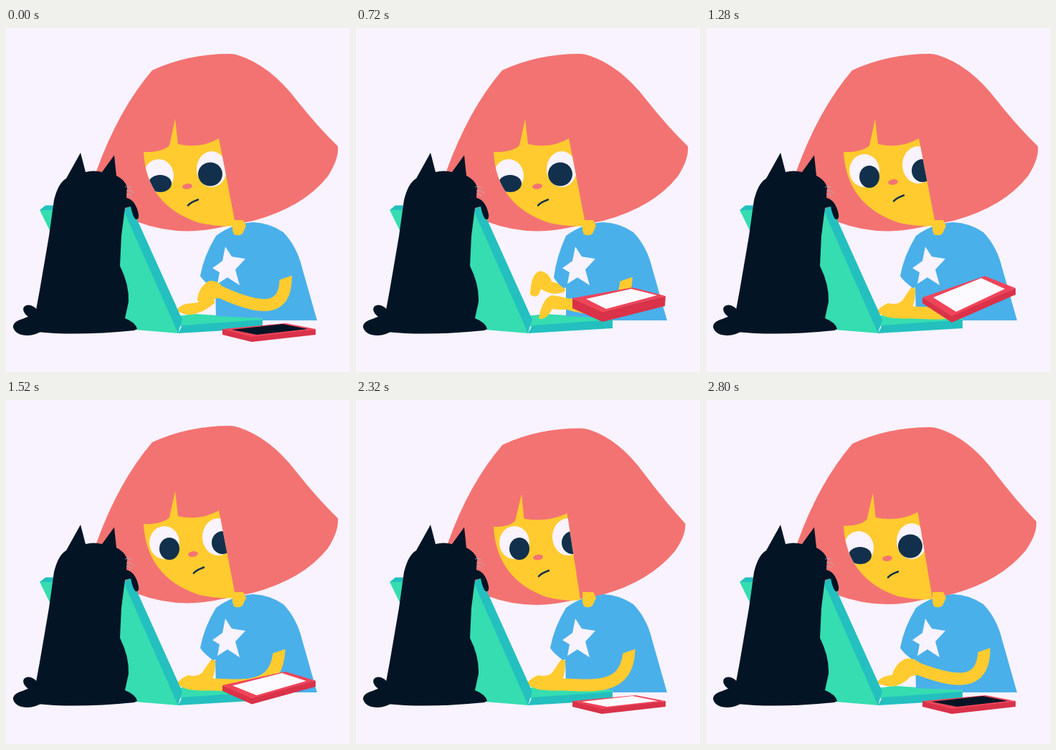
Write an HTML page that moves like this. It is 480 px wide and 480 px high and loops after 2.88 s.

```html
<!DOCTYPE html>
<html lang="en">
<head>
<meta charset="utf-8">
<title>Girl, cat and phone</title>
<style>
html, body { margin: 0; width: 100%; height: 100%; overflow: hidden; background: #f8f3ff; }
svg { display: block; width: 100%; height: 100%; }
.skin { fill: #ffcb2f; }
.limb { fill: none; stroke: #ffcb2f; stroke-width: 17; stroke-linecap: round; }
.shirt { fill: #4ab0ea; }
.hair { fill: #f37372; }
.white { fill: #f8f3ff; }
.pupil { fill: #12304c; }
.line { fill: none; stroke: #12304c; stroke-width: 2.6; stroke-linecap: round; }
.green { fill: #35ddb0; }
.teal { fill: #23c0bf; }
.cat { fill: #031425; }
</style>
</head>
<body>
<svg viewBox="0 0 480 480">
  <defs><clipPath id="faceClip"><path id="faceEdge"/></clipPath></defs>

  <!-- keyboard -->
  <path class="green" d="M238 402L264 399L358 405L357 410L244 417Z"/>
  <path class="teal" d="M246 415L358 407V419L240 426Z"/>

  <!-- body -->
  <path id="far" class="skin"/>
  <path id="shirt" class="shirt"/>
  <path class="white" d="M306 305L315 319L334 322L320 337L326 359L309 348L295 357L298 341L288 335L302 325Z"/>

  <!-- head -->
  <path id="hair" class="hair"/>
  <path class="skin" d="M316 268H331L335 276L330 287Q325 291 318 288L316 282Z"/>
  <path id="face" class="skin"/>
  <g clip-path="url(#faceClip)">
    <g id="open">
      <ellipse id="whiteL" class="white"/><ellipse id="pupilL" class="pupil"/>
      <ellipse id="whiteR" class="white"/><ellipse id="pupilR" class="pupil"/>
    </g>
    <path id="shut" class="line" stroke-width="3" d="M198 216Q213 210 228 219M265 209Q277 194 297 196"/>
    <g id="mouth">
      <ellipse cx="253" cy="221" rx="7" ry="3.8" fill="#f37372" transform="rotate(-8 253 221)"/>
      <path class="line" d="M254 247.5Q258 243 268 239.5"/>
    </g>
  </g>

  <path id="near" class="limb"/>
  <path id="hand" class="skin"/>
  <path id="cuff" class="shirt" d="M-11 -12H11L10 7L-10 14Z"/>

  <!-- laptop lid -->
  <path class="green" d="M47 254L165 252L241 426L180 421L80 321Z"/>
  <path class="teal" d="M47 254L55 247.5H72V254Z"/>
  <path class="teal" d="M164 254L174 247.5L246 407L240 426Z"/>

  <!-- cat -->
  <g id="tail" class="cat">
    <ellipse cx="35" cy="396" rx="12" ry="8" transform="rotate(35 35 396)"/>
    <path d="M50 401Q35 400 23 406Q9 410 10 418Q14 429 30 429Q42 429 52 421Z"/>
  </g>
  <path class="cat" d="M104 174L111 201Q122 198 134 201L151 177.5L154 206Q166 212 169 222L168 237Q181 240 185 260Q186 268 181 267Q177 264 174 249L166 251L161 290L159 332Q172 358 171 382L166 405Q181 411 183 420L179 422Q100 430 42 424L42 393L47 366L60 290L67 240Q73 216 84 210Z"/>
  <path d="M166 222Q172 220 175 223M168 227Q175 226 179 231M168 232Q173 231 175 235" fill="none" stroke="#a9bccb" stroke-width=".8"/>

  <!-- phone -->
  <path id="side" fill="#d93249"/>
  <path id="top" fill="#ef4459"/>
  <path id="screen"/>
</svg>

<script>
const $ = id => document.getElementById(id);
const LOOP = 2880, STEP = 80;
const NUM = /-?\d+(\.\d+)?/g;

// Blend every number of two equally built strings.
function mix(a, b, k) {
  const to = String(b).match(NUM);
  let i = 0;
  return String(a).replace(NUM, n => +(+n + (to[i++] - n) * k).toFixed(2));
}

// Value of a keyed track [time, value] at time t.
function at(keys, t) {
  const i = keys.findIndex(key => key[0] > t);
  if (i < 0) return keys[keys.length - 1][1];
  const [t0, a] = keys[i - 1], [t1, b] = keys[i];
  return mix(a, b, (t - t0) / (t1 - t0));
}

const HAIR = [
  "M126 200Q157 114 204 59Q254 36 312 36Q318 36 324 38Q368 52 405 100Q435 138 463 165Q465 182 449 207Q415 250 345 269L300 278Q240 292 182 270L126 240Z",
  "M130 200Q158 120 205 66Q252 43 312 43Q318 42 324 44Q366 56 401 108Q430 148 456 180Q456 197 440 216Q404 256 348 273L305 281Q240 298 182 276L126 240Z"
];
const FACE = [
  "M192 173Q217 174 228 164L236 127L240 162Q272 169 297 154L319 268L320 276Q300 278 270 272Q196 248 192 173Z",
  "M192 181Q206 182 216 174L226 136L229 169Q262 174 292 162L305 274L305 282Q288 285 262 278Q196 252 192 181Z"
];
const SHIRT = [
  "M293 290Q315 273 345 271Q368 272 387 285Q406 305 413 334L434 408H358V405L293 402L292 362L289 363Q276 354 271 346Q276 318 293 290Z",
  "M293 290Q315 273 345 271Q368 272 387 285Q406 305 413 334L434 408H358V405L293 402L293 362L290 363Q281 357 276 348Q280 318 293 290Z"
];
// Each eye part as cx cy rx ry: looking at the laptop, then at the phone.
const EYES = {
  whiteL: ["213 206 21 23", "221 199 21 23"],
  pupilL: ["215 217 16 12", "228 207.5 14 15.5"],
  whiteR: ["287 197 21 25", "296 191 22 26"],
  pupilR: ["285 204 17 16.5", "302 199 15 16"]
};
const PHONE = {
  side: ["M302 420L343 430L432 420L432 428L343 438L302 428Z",
         "M302 377L344 396L432 374L431 388L344 410L302 391Z",
         "M302 376L343 401L432 363L432 372L343 411L302 384Z"],
  top: ["M302 420L390 412L432 420L343 431Z",
        "M302 377L386 362L432 374L344 396Z",
        "M302 376L389 346L432 363L343 402Z"],
  screen: ["M315 421L386 413L421 420L350 428Z",
           "M321 378L384 364L420 373L349 392Z",
           "M317 376L384 349L417 364L349 396Z"]
};

// Poses: arm raised high, resting low, and the start of the loop.
const farStart = "M238 394Q244 384 260 384Q268 384 276 378L290 372L291 384Q276 396 266 398Q254 404 238 394Z";
const farRest = "M238 396Q244 388 254 384Q268 387 274 380L287 361L292 364Q292 385 286 392Q270 402 238 396Z";
const nearStart = "M390 338C395 402 352 393 296 367";
const nearRest = "M381 340C384 408 330 398 290 397";
const handStart = "M267 380Q268 362 283 353Q292 352 300 358L300 376Q288 378 284 382Q276 388 267 380Z";
const handRest = "M238 396Q250 386 262 386Q276 382 290 389L292 405Q276 406 266 405Q250 405 238 396Z";

const far = [
  [0, farStart],
  [320, "M240 390Q244 364 256 361Q266 361 272 368L286 366L288 376Q276 386 266 380Q258 398 240 390Z"],
  [720, "M243 372Q244 341 258 339Q270 342 273 354L290 358L292 367Q276 376 258 364Q254 380 243 372Z"],
  [1200, farRest], [2560, farRest], [LOOP, farStart]
];
const near = [
  [0, nearStart],
  [160, "M402 337C407 400 354 392 296 366"],
  [320, "M389 338C395 406 345 393 296 377"],
  [720, "M377 340C380 402 340 395 300 386"],
  [1200, nearRest], [2560, nearRest], [LOOP, nearStart]
];
const hand = [
  [0, handStart],
  [320, "M267 396Q262 366 272 362Q284 363 296 367L298 386Q288 384 284 384Q276 398 267 396Z"],
  [720, "M255 405Q260 377 273 373Q284 374 302 379L302 392Q288 394 274 392Q264 410 255 405Z"],
  [1200, handRest], [2560, handRest], [LOOP, handStart]
];
const sleeve = [[0, 0], [720, 1], [1200, 0], [LOOP, 0]];
const dip = [[0, 0], [720, 0], [880, 1], [960, .8], [1120, 0], [2240, 0], [2400, 1], [2560, 1], [2800, .3], [LOOP, 0]];
const gaze = [[0, 0], [800, 0], [960, 1], [2480, 1], [2560, 0], [LOOP, 0]];
const mouth = [
  [0, "translate(0 0)"], [720, "translate(0 0)"], [880, "translate(-2 2)"], [1040, "translate(8 -6)"],
  [2240, "translate(8 -6)"], [2400, "translate(-6 3)"], [2560, "translate(-6 3)"],
  [2800, "translate(0 0)"], [LOOP, "translate(0 0)"]
];
const tail = [[0, 0], [320, 0], [440, 12], [560, 0], [720, 0], [920, 12], [1120, 0], [LOOP, 0]];
const hop = [
  [0, 0], [560, 0], [640, .55], [720, 1], [800, 1.06], [880, .9], [960, .6], [1120, .08],
  [1200, .55], [1280, 1], [1360, 1.04], [1440, .85], [1520, .5], [1600, .15],
  [1680, 0], [1760, .04], [1840, 0], [LOOP, 0]
];

function draw(t) {
  const set = (id, d) => $(id).setAttribute("d", d);
  const down = +at(dip, t), look = +at(gaze, t), lift = +at(hop, t);

  set("hair", mix(...HAIR, down));
  const face = mix(...FACE, down);
  set("face", face);
  set("faceEdge", face);

  for (const id in EYES) {
    const v = mix(...EYES[id], look).split(" ");
    ["cx", "cy", "rx", "ry"].forEach((name, i) => $(id).setAttribute(name, v[i]));
  }
  const closed = (t >= 880 && t < 960) || (t >= 2400 && t < 2720);
  $("open").style.display = closed ? "none" : "";
  $("shut").style.display = closed ? "" : "none";
  $("mouth").setAttribute("transform", at(mouth, t));

  const arm = at(near, t);
  const [x, y] = arm.match(NUM);
  set("near", arm);
  set("hand", at(hand, t));
  set("far", at(far, t));
  set("shirt", mix(...SHIRT, +at(sleeve, t)));
  $("cuff").setAttribute("transform", `translate(${x} ${y})`);
  $("tail").setAttribute("transform", `rotate(${at(tail, t)} 46 420)`);

  const pose = t < 1200 ? 1 : 2;
  for (const id in PHONE) set(id, mix(PHONE[id][0], PHONE[id][pose], lift));
  $("screen").setAttribute("fill", t >= 640 && t < 2720 ? "#fcf9ff" : "#031425");
}

const start = performance.now();
function tick() {
  const t = (performance.now() - start) % LOOP;
  draw(Math.floor(t / STEP) * STEP);
  requestAnimationFrame(tick);
}
tick();
</script>
</body>
</html>
```
